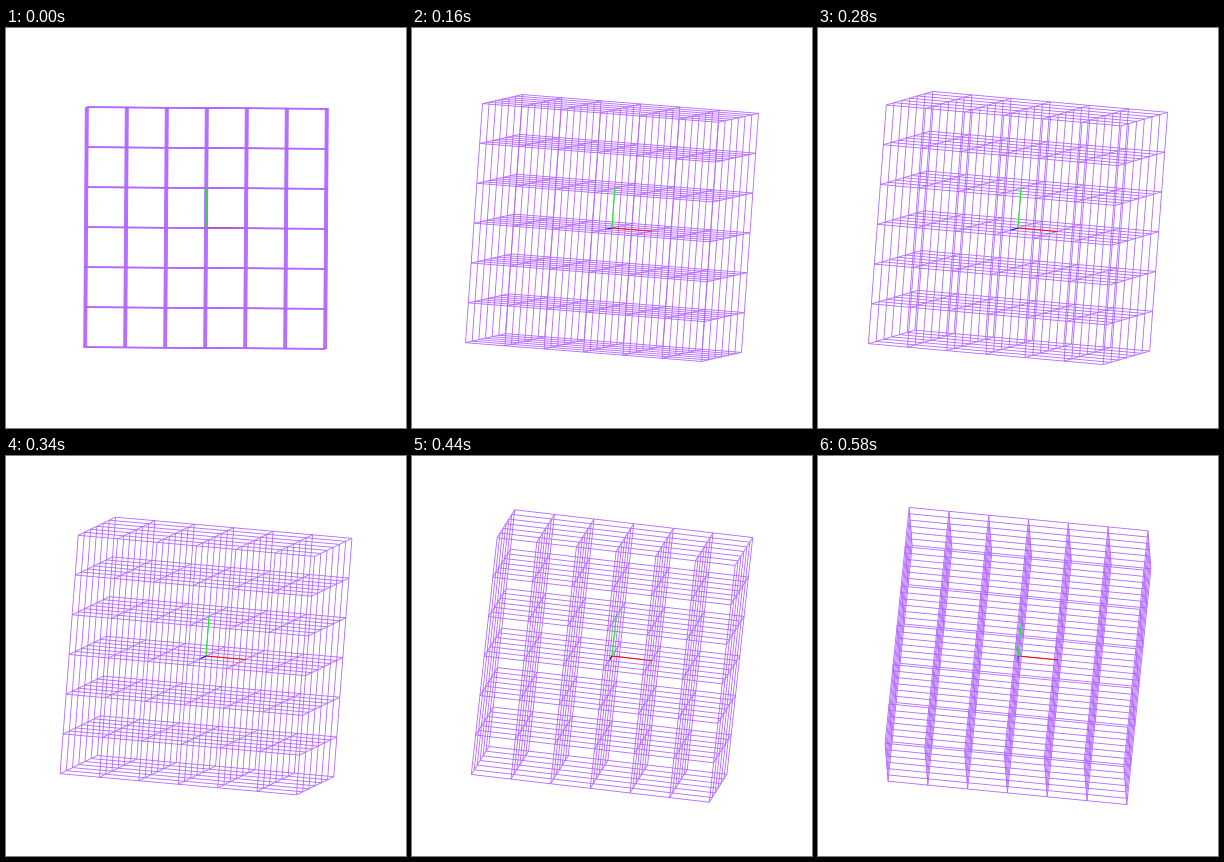
Animation of 400x400 px, one loop 600 ms. Source, as a matplotlib script:

```python
import numpy as np
import matplotlib.pyplot as plt
from matplotlib.animation import FuncAnimation
from matplotlib.collections import LineCollection

FRAMES, INTERVAL = 30, 20
SIZE, DPI, CELL, HALF = 400, 100, 40, 3
LINE_PX = 0.85
PURPLE = "#b266ff"

# Hand-steered view: yaw, pitch and roll (radians) at a few moments.
KEYS = np.array([0, 4, 8, 14, 19, 25, 29])
POSES = np.array([
    [.0125, .003, .0067],
    [.091, .025, .043],
    [.164, .050, .071],
    [.190, .072, .075],
    [.113, .102, .084],
    [.016, .143, .1245],
    [-.0285, .1567, .102],
])


def natural_spline(keys, values):
    """Smooth curve through the keys, as a sum of cubic kernels."""
    n = len(keys)
    line = np.column_stack([np.ones(n), keys])
    kernel = np.abs(keys[:, None] - keys) ** 3
    system = np.block([[kernel, line], [line.T, np.zeros((2, 2))]])
    weights = np.linalg.solve(system, np.vstack([values, np.zeros((2, 3))]))
    return lambda t: np.append(np.abs(t - keys) ** 3, [1, t]) @ weights


pose = natural_spline(KEYS, POSES)


def view(t):
    """Rows: where one unit along x, y and z lands on the stage (y down)."""
    a, b, c = pose(t)
    right = np.array([np.cos(c), np.sin(c)])
    up = np.array([np.sin(c), -np.cos(c)])
    return CELL * np.array([
        np.cos(a) * right - np.sin(a) * np.sin(b) * up,
        np.cos(b) * up,
        -np.sin(a) * right - np.cos(a) * np.sin(b) * up,
    ])


def layer(z):
    """Lines of one square grid facing the viewer."""
    lines = []
    for k in range(-HALF, HALF + 1):
        lines.append([(-HALF, k, z), (HALF, k, z)])
        lines.append([(k, -HALF, z), (k, HALF, z)])
    return lines


steps = range(-HALF, HALF + 1)
back = [s for z in range(-HALF, 1) for s in layer(z)]
back += [[(x, y, -HALF), (x, y, HALF)] for x in steps for y in steps]
front = [s for z in range(1, HALF + 1) for s in layer(z)]
x_axis, y_axis, z_axis = ([(0, 0, 0), tip] for tip in np.eye(3))

fig = plt.figure(figsize=(SIZE / DPI, SIZE / DPI), dpi=DPI, facecolor="white")
ax = fig.add_axes([0, 0, 1, 1])
ax.set(xlim=(0, SIZE), ylim=(SIZE, 0))
ax.axis("off")


def add_lines(lines, colors, order, width=LINE_PX):
    art = LineCollection([], colors=colors, linewidths=width * 72 / DPI,
                         antialiaseds=True, capstyle="butt", zorder=order)
    art.set_snap(False)
    ax.add_collection(art, autolim=False)
    return art, np.array(lines, float)


groups = [
    add_lines(back, PURPLE, 1),
    add_lines([x_axis, z_axis], ["#ff0000", "#0000ff"], 2, 1),
    add_lines(front, PURPLE, 3),
    add_lines([y_axis], "#00ff00", 4, 1),
]


def draw(frame):
    basis = view(frame)
    for art, lines in groups:
        art.set_segments(SIZE / 2 + lines @ basis)
    return [art for art, _ in groups]


anim = FuncAnimation(fig, draw, frames=FRAMES, interval=INTERVAL,
                     repeat=True, repeat_delay=0, blit=False)
plt.show()
```
